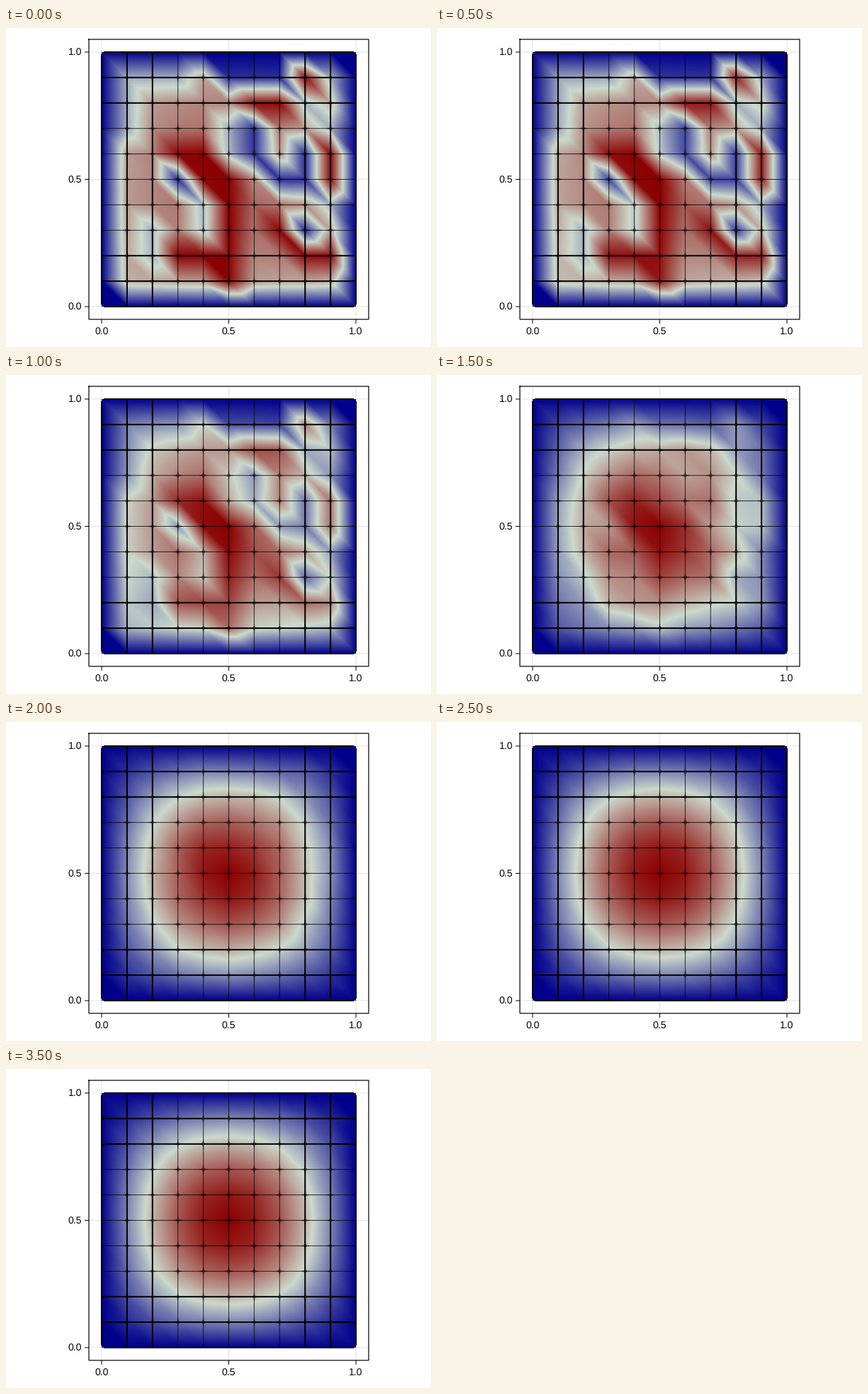
Write a matplotlib script that moves like this. It is 600x450 px and loops after 4.5 s.

```python
import numpy as np
import matplotlib.pyplot as plt
from matplotlib.animation import FuncAnimation
from matplotlib.collections import LineCollection
from matplotlib.colors import LinearSegmentedColormap

plt.rcParams["text.hinting"] = "none"
plt.rcParams["text.hinting_factor"] = 1

W, H, DPI = 600, 450, 100
PT = 72 / DPI                       # points per pixel
LEFT, RIGHT, TOP, BOTTOM = 117, 512, 16, 411
SPAN = (RIGHT - LEFT) / 1.1
MARGIN = SPAN * 0.05
N = 10                              # mesh cells per side
STEPS, LAST_CHANGE = 9, 7

# Paths of equal temperature through the mesh, in (column, row) from bottom left
COOL = [[(1, 9), (1, 7)], [(2, 9), (3, 9)], [(5, 7), (5, 6)], [(4, 4), (4, 3)],
        [(2, 3), (2, 2)], [(8, 8), (9, 7)], [(9, 4)], [(9, 9)]]
COLD = [[(5, 9), (7, 9)], [(6, 7), (6, 6), (7, 5), (8, 5), (8, 6)],
        [(3, 5)], [(8, 3)]]
HOT = [[(3, 6), (4, 5), (5, 5), (5, 3)], [(4, 6)], [(6, 8), (7, 8)], [(8, 9)],
       [(9, 6), (9, 5)], [(7, 3), (8, 2), (9, 2)], [(3, 2), (5, 2), (5, 1)]]

CMAP = LinearSegmentedColormap.from_list(
    "heat", [(0, 0, 139 / 255), (0.8, 0.85, 0.8), (139 / 255, 0, 0)], N=1024)


def px(u):
    return LEFT + MARGIN + SPAN * u


def py(v):
    return BOTTOM - MARGIN - SPAN * v


def distance(a, b, x, y):
    """Distance from each mesh node to the segment from a to b."""
    dx, dy = b[0] - a[0], b[1] - a[1]
    along = ((x - a[0]) * dx + (y - a[1]) * dy) / max(dx * dx + dy * dy, 1)
    along = np.clip(along, 0, 1)
    return np.hypot(x - a[0] - along * dx, y - a[1] - along * dy)


def start_field(mode):
    y, x = np.mgrid[0:N + 1, 0:N + 1]
    u = 0.56 + 0.18 * mode
    for paths, temperature in ((COOL, 0.38), (HOT, 0.95), (COLD, 0.1)):
        for path in paths:
            d = np.min([distance(a, b, x, y)
                        for a, b in zip(path, path[1:] or path)], axis=0)
            u += (temperature - u) * np.exp(-(d / 0.5) ** 2)
    u[[0, -1]] = 0
    u[:, [0, -1]] = 0
    return u


wave = np.sin(np.pi * np.arange(N + 1) / N)
MODE = np.outer(wave, wave)
START = start_field(MODE)


def heat(step):
    """The lowest mode outgrows the start field by a fixed ratio per step."""
    weight = 1 / (1 + np.exp(1.87 * (2.33 - min(step, LAST_CHANGE))))
    u = START + weight * (MODE - START)
    return u / u.max()


cols = np.arange(135, 494)
rows = np.arange(34, 393)
gx = np.clip((cols + 0.5 - px(0)) / SPAN, 0, 1) * N
gy = np.clip((py(0) - rows - 0.5) / SPAN, 0, 1) * N
ci = np.minimum(gx.astype(int), N - 1)
ri = np.minimum(gy.astype(int), N - 1)
FX, FY = np.meshgrid(gx - ci, gy - ri)
CI, RI = np.meshgrid(ci, ri)


def shade(step):
    """Linear interpolation on cells split from top left to bottom right."""
    u = heat(step)
    bl, br = u[RI, CI], u[RI, CI + 1]
    tl, tr = u[RI + 1, CI], u[RI + 1, CI + 1]
    lower = bl + FX * (br - bl) + FY * (tl - bl)
    upper = tr + (1 - FX) * (tl - tr) + (1 - FY) * (br - tr)
    return np.where(FX + FY <= 1, lower, upper)


fig = plt.figure(figsize=(W / DPI, H / DPI), dpi=DPI, facecolor="white")
ax = fig.add_axes([0, 0, 1, 1])
ax.axis("off")


def strokes(segments, width, alpha=1.0, z=3):
    ax.add_collection(LineCollection(
        segments, colors=[(0, 0, 0, alpha)], linewidths=width * PT,
        capstyle="butt", zorder=z, snap=False), autolim=False)


def label(x, y, value, ha):
    ax.text(x, y, f"{value:.1f}", ha=ha, va="center_baseline",
            family="Liberation Sans", fontsize=14 * PT, color="black")


field = ax.imshow(shade(0), cmap=CMAP, vmin=0, vmax=1, aspect="auto",
                  interpolation="nearest", extent=(135, 494, 393, 34), zorder=2)
ax.set_xlim(0, W)
ax.set_ylim(H, 0)

# Axis grid, ticks and labels
for v in (0, 0.5, 1):
    x, y = px(v), py(v)
    strokes([[(x, TOP), (x, BOTTOM)], [(LEFT, y), (RIGHT, y)]], 1, 0.12, z=1)
    strokes([[(x, BOTTOM), (x, BOTTOM + 6)], [(LEFT - 6, y), (LEFT, y)]], 1)
    label(x, 427.2, v, "center")
    label(107, y - 0.8, v, "right")

ax.plot([LEFT, RIGHT, RIGHT, LEFT, LEFT], [TOP, TOP, BOTTOM, BOTTOM, TOP],
        color="black", lw=1.2 * PT, solid_joinstyle="miter", zorder=5, snap=False)

# Mesh lines, heavier in the two outer rings; the rim stops short of its corners
for k in range(N + 1):
    rim = k in (0, N)
    heavy = min(k, N - k) <= 2
    x, y = px(k / N), py(k / N)
    inset = 3 if rim else 0
    strokes([[(x, py(0) - inset), (x, py(1) + inset)],
             [(px(0) + inset, y), (px(1) - inset, y)]],
            2 if heavy else 1, 1 if heavy else 0.78)

# Line ends overlap at the nodes and leave small dark crosses
for reach, width, alpha in ((6, 1.8, 0.25), (3, 2.6, 0.3)):
    cross = []
    for i in range(1, N):
        for j in range(1, N):
            x, y = px(i / N), py(j / N)
            cross += [[(x - reach, y), (x + reach, y)],
                      [(x, y - reach), (x, y + reach)]]
    strokes(cross, width, alpha)


def update(step):
    field.set_data(shade(step))
    return [field]


anim = FuncAnimation(fig, update, frames=STEPS, interval=500,
                     repeat=True, repeat_delay=0)
plt.show()
```
